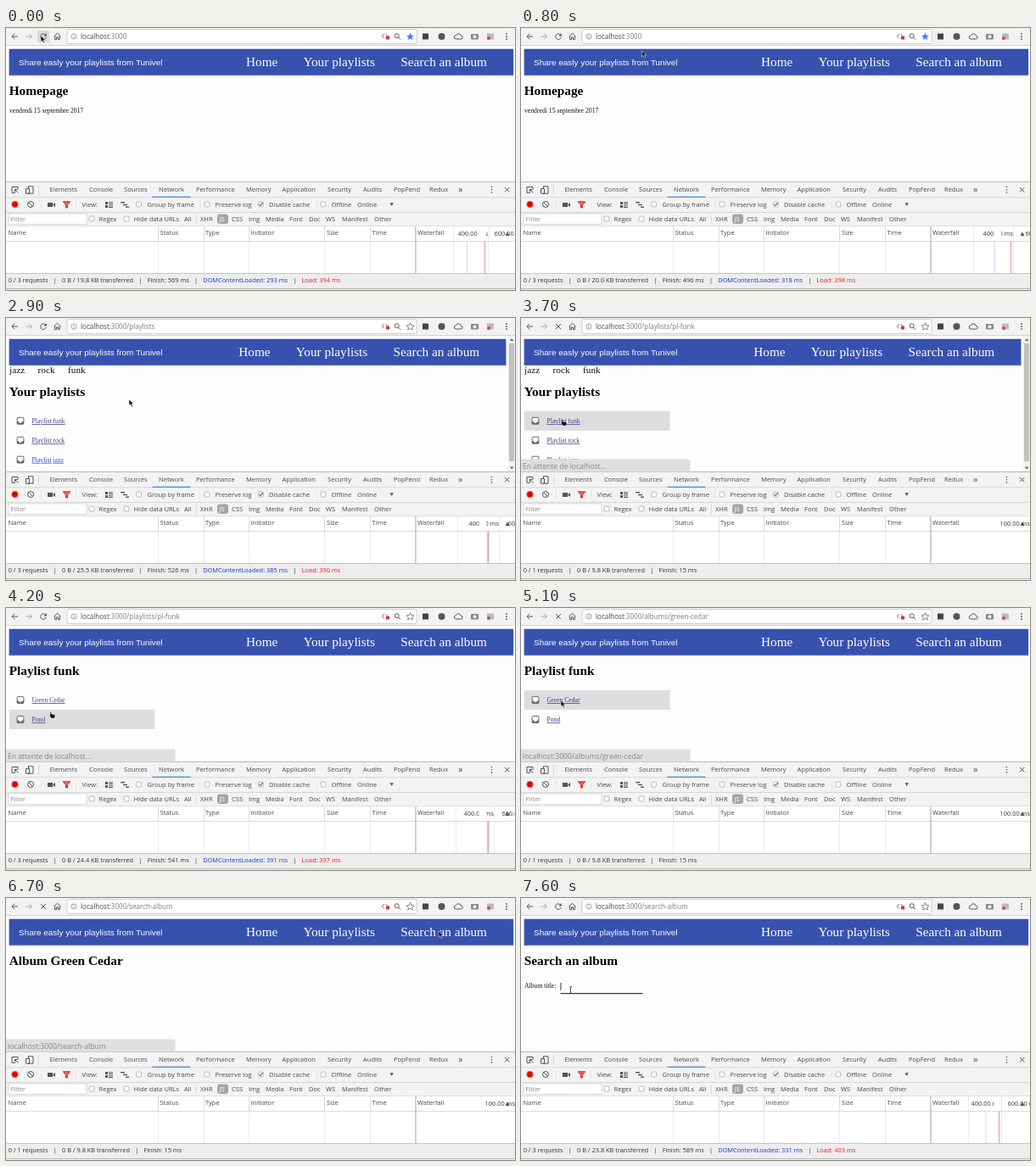
Animation, 600 px wide and 309 px high, one loop 8 s. Source, as an HTML page:

```html
<!DOCTYPE html>
<html lang="en">
<head>
<meta charset="utf-8">
<title>Playlist app walkthrough</title>
<style>
html, body { margin: 0; width: 100%; height: 100%; overflow: hidden; background: #fff; }
svg { display: block; width: 100vw; height: 100vh; }
text { white-space: pre; }
.ui { font: 7.55px "Open Sans", "Noto Sans", sans-serif; fill: #484848; }
.url { font-size: 8.05px; }
.hint { font-size: 8.6px; fill: #858585; }
.foot { font-size: 7.4px; fill: #333; }
.sans { font: 9.95px "Liberation Sans", Arial, sans-serif; fill: #fff; }
.serif { font: 7.7px "Liberation Serif", Times, serif; fill: #111; }
.nav { font-size: 15.25px; fill: #fff; }
.tag { font-size: 11.3px; }
.h1 { font-size: 15.3px; font-weight: bold; fill: #000; }
.link { text-decoration: underline; text-decoration-thickness: .5px; }
.line { fill: none; stroke: #555; stroke-width: 1; }
</style>
</head>
<body>
<svg viewBox="0 0 600 309" preserveAspectRatio="none">
  <g id="page"></g>
  <g id="frame"></g>
  <g id="live"></g>
  <g id="pointer"></g>
</svg>
<script>
const $ = id => document.getElementById(id);
const text = (x, y, str, cls = 'ui', attrs = '') => `<text x="${x}" y="${y}" class="${cls}" ${attrs}>${str}</text>`;
const rect = (x, y, w, h, fill, attrs = '') => `<rect x="${x}" y="${y}" width="${w}" height="${h}" fill="${fill}" ${attrs}/>`;
const dot = (x, y, r, fill, attrs = '') => `<circle cx="${x}" cy="${y}" r="${r}" fill="${fill}" ${attrs}/>`;
const path = (d, attrs = 'class="line"') => `<path d="${d}" ${attrs}/>`;
const row = (y, items, cls) => items.map(([x, str]) => text(x, y, str, cls)).join('');
const fill = color => `fill="${color}"`;

// ---- Fixed browser and developer tools parts ----
function check(x, y, on) {
  return rect(x - 2.9, y - 2.9, 5.8, 5.8, '#fff', 'rx="1" stroke="#aaa" stroke-width=".8"') +
    (on ? path(`M${x - 2} ${y}l1.5 1.7 2.7-3.7`, 'fill="none" stroke="#333"') : '');
}

function toolbar() {
  const dots = [7, 10, 13].map(y => dot(590, y, .9, '#555')).join('');
  return rect(0, 0, 600, 20, '#f2f2f2') + rect(0, 20, 600, .8, '#ccc') +
    rect(72, 1.5, 412, 17, '#fff', 'rx="2" stroke="#c4c4c4" stroke-width=".8"') +
    path('M14 10H7M10.2 6.7L6.9 10l3.3 3.3') +
    path('M23.5 10h7M27.3 6.7l3.3 3.3-3.3 3.3', 'fill="none" stroke="#aaa"') +
    path('M56.5 10l4-3.8 4 3.8M57.7 9.5v4.2h1.8v-2.8h2v2.8h1.8V9.5') +
    dot(80, 10, 3.1, 'none', 'stroke="#777" stroke-width=".7"') + path('M80 9.5v2.3M80 7.8v.8', 'stroke="#777" stroke-width=".8"') +
    path('M445.7 7.2l-2.3 2.6 2.3 2.6M447.8 7.2l2 2.3', 'fill="none" stroke="#555" stroke-width=".9"') + rect(448, 9.5, 4, 4, '#d33') +
    dot(460.7, 9.2, 2.5, 'none', 'class="line"') + path('M462.5 11l2.7 2.7') +
    rect(491, 6.5, 7, 7, '#444') + dot(513.5, 10, 4, '#555') +
    path('M530.3 13h6a1.9 1.9 0 0 0 0-3.8a3 3 0 0 0-5.8-.4a2.1 2.1 0 0 0-.2 4.2z') +
    rect(548, 7, 9, 6.5, '#888', 'rx="1"') + dot(552.5, 10.3, 2, '#eee') +
    rect(567, 6.5, 8, 7, '#bbb') + dot(569, 12, 2, '#d44') + dots;
}

function devtools() {
  const bars = rect(0, 181, 600, 128, '#f3f3f3') + rect(0, 181, 600, .8, '#aaa') +
    [199.5, 217, 233.5].map(y => rect(0, y, 600, .7, '#ccc')).join('') +
    rect(0, 234, 600, 55, '#fff') + rect(0, 251, 600, .7, '#ccc') +
    rect(0, 289, 600, 18, '#ededed') + rect(0, 289, 600, .8, '#bbb') + rect(0, 307, 600, .8, '#aaa') +
    [179, 233, 286, 375, 429].map(x => rect(x, 234, .7, 17, '#ccc') + rect(x, 251, .7, 38, '#e2e2e2')).join('') +
    rect(482.5, 234, .9, 55, '#999');
  const tabs = row(193, [[51.5, 'Elements'], [98, 'Console'], [139, 'Sources'], [180, 'Network'],
    [224, 'Performance'], [283, 'Memory'], [325.5, 'Application'], [379, 'Security'],
    [421, 'Audits'], [457, 'PopFend'], [499, 'Redux']]) +
    text(533, 194, '»', 'ui', 'style="font-size:11px"') + rect(172.5, 198.7, 45, 1.3, '#4a8ad8') +
    path('M11 194.3H7v-6.8h7v3M10.5 190.5l4 4M10.5 190.5v3M10.5 190.5h3') +
    path('M26 186.8h6v8.4h-6M26.5 186.8v2.5M23.5 189.5h4v5.7h-4z') + rect(38, 185, .7, 12, '#ccc') +
    [187.5, 190.7, 193.9].map(y => dot(572.5, y, .8, '#555')).join('') + path('M588 188l5.4 5.4M593.4 188l-5.4 5.4');
  const tools = row(211, [[89.5, 'View:'], [166.5, 'Group by frame'], [246.5, 'Preserve log'], [310, 'Disable cache'],
    [383.5, 'Offline'], [414, 'Online']]) +
    dot(10.5, 208, 3.9, '#e00000', 'stroke="#f3a0a0" stroke-width=".8"') +
    dot(29, 208, 3.5, 'none', 'class="line"') + path('M26.6 205.6l4.8 4.8') +
    rect(49, 206, 6, 5, '#555') + path('M55 208.5l3-2.5v5z', fill('#555')) +
    path('M67.3 204.8h8.4l-3.2 3.8v3.4h-2v-3.4z', 'fill="#e66" stroke="#e02020"') +
    [205, 209].map(y => rect(117, y, 3, 3, '#555') + rect(121, y + .2, 5, 1, '#555') + rect(121, y + 2, 5, 1, '#555')).join('') +
    rect(135, 205, 5, 1.4, '#555') + rect(138, 207.8, 5, 1.4, '#555') + rect(141, 210.5, 4, 1.4, '#555') +
    [156.5, 237, 300.5, 374].map((x, i) => check(x, 208, i === 2)).join('') +
    [41, 82, 228, 366].map(x => rect(x, 203, .6, 11, '#ddd')).join('') +
    path('M452.5 206.3h4.4l-2.2 3.6zM458.5 205v6', fill('#555'));
  const filters = rect(3, 219, 92, 12.5, '#fff', 'stroke="#ccc" stroke-width=".7"') +
    rect(249, 219.5, 13, 11.5, '#a5a5a5', 'rx="3"') +
    row(228, [[109.5, 'Regex'], [150.5, 'Hide data URLs'], [210, 'All'], [229, 'XHR'], [266, 'CSS'],
      [286, 'Img'], [306, 'Media'], [334, 'Font'], [357, 'Doc'], [377, 'WS'], [396, 'Manifest'], [434, 'Other']]) +
    text(5.5, 228, 'Filter', 'ui', 'style="fill:#888"') +
    text(251.5, 228, 'JS', 'ui', 'style="fill:#fff"') + rect(224, 220, .6, 11, '#ccc') +
    check(101, 225) + check(142, 225);
  const heads = row(244.3, [[2.5, 'Name'], [181.5, 'Status'], [235, 'Type'], [288.5, 'Initiator'],
    [378, 'Size'], [431.5, 'Time'], [485, 'Waterfall']]);
  return bars + tabs + tools + filters + heads;
}

// ---- Web pages ----
const tray = y => `<g transform="translate(17 ${y})">` +
  rect(-3.9, -3.9, 7.8, 7.8, '#fff', 'rx="1" stroke="#666"') +
  path('M-4 1h2.2a1.8 1.8 0 0 0 3.6 0H4v3h-8z', fill('#666')) + '</g>';
const list = (y, names, hover, blue) => names.map((name, i) => {
  const mid = y + i * 22.9;
  return (i === hover ? rect(4, mid - 11.5, 171.5, 23, '#dddddf') : '') + tray(mid) +
    text(30.5, mid + 2.7, name, 'serif link', `style="fill:${i === blue ? '#2b4bd8' : '#4d3a86'}"`);
}).join('');
const title = (str, y = 78.8) => text(3.7, y, str, 'serif h1');

const pages = {
  home: () => title('Homepage') + text(4, 100, 'vendredi 15 septembre 2017', 'serif'),
  lists: s => row(65, [[4, 'jazz'], [37.5, 'rock'], [73, 'funk']], 'serif tag') + title('Your playlists', 91.6) +
    list(121.3, ['Playlist funk', 'Playlist rock', 'Playlist jazz'], s.hover, 2) +
    rect(592, 21, 8, 160, '#f1f1f1') + rect(593, 30, 6, 139, '#c1c1c1') +
    path('M594 27l2.2-3 2.2 3zM594 175.5l2.2 3 2.2-3z', fill('#666')),
  funk: s => title('Playlist funk') + list(108.5, ['Green Cedar', 'Pond'], s.hover),
  album: () => title('Album Green Cedar'),
  search: s => title('Search an album') + text(4, 106, 'Album title:', 'serif') +
    rect(46.5, 112, 97, 1.2, '#333') + (s.caret ? rect(46.5, 100, .9, 9, '#222') : '')
};

function page(s) {
  const shift = s.page === 'lists' ? 8.7 : 0;
  const bar = rect(3.5, 25.5, 594.8 - shift, 31.5, '#000', 'opacity=".13"') + rect(3.7, 24.7, 594.4 - shift, 31, '#3751ae') +
    text(15, 44, 'Share easly your playlists from Tunivel', 'sans') +
    row(45, [[283 - shift, 'Home'], [350.5 - shift, 'Your playlists'], [465.3 - shift, 'Search an album']], 'serif nav');
  return rect(0, 20, 600, 162, '#fdfdfe') + bar + pages[s.page](s);
}

// ---- Changing browser parts ----
function footer([count, size, finish, dom, load]) {
  const parts = [[`0 / ${count} requests`], [`0 B / ${size} KB transferred`], [`Finish: ${finish} ms`]];
  if (dom) parts.push([`DOMContentLoaded: ${dom} ms`, '#1437d2'], [`Load: ${load} ms`, '#e8192c']);
  return text(2.7, 300, parts.map(([str, color = '#333'], i) =>
    (i ? '<tspan dx="6.2">|</tspan>' : '') + `<tspan dx="${i ? 6.2 : 0}" style="fill:${color}">${str}</tspan>`).join(''), 'ui foot');
}

function waterfall(s) {
  const label = (x, n) => text(x, 245, n + '.00 ms', 'ui foot', 'text-anchor="end"');
  const grid = x => rect(x, 234, .7, 55, '#e2e2e2');
  const sort = path('M588.5 245l2.5-4.5 2.5 4.5z', fill('#555'));
  if (!s.ticks) return label(600, 100) + sort;
  const [edge, near, far, blue, red] = s.ticks;
  return grid(edge) + (near ? grid(near) + label(near, 400) + rect(557.5, 235, 8.5, 15, '#fff') : '') +
    label(far, 600) + sort + rect(blue, 251.5, 1, 37.5, '#cbd7f5') + rect(red, 251.5, 1.1, 37.5, '#dd9a9a');
}

function live(s) {
  const star = path('M476.5 5.6l1.3 3 3.2.3-2.4 2.1.7 3.1-2.8-1.7-2.8 1.7.7-3.1-2.4-2.1 3.2-.3z',
    s.page === 'home' ? fill('#4285f4') : 'fill="none" stroke="#666" stroke-width=".8"');
  const reload = s.busy ? path('M41 7l6 6M47 7l-6 6')
    : path('M46.8 8.4a3.3 3.3 0 1 0 .4 2.5') + path('M47.8 6v3.4h-3.4z', fill('#555'));
  const hint = s.hint && path('M0 166.5h197q2.5 0 2.5 2.5v12.5H0z', fill('#dfdfdf')) + text(2, 177.5, s.hint, 'ui hint');
  return (s.hot ? rect(37, 3, 14, 14, '#d9d9d9', 'rx="2"') : '') + reload + star +
    text(88, 13, `localhost<tspan style="fill:#7c7c7c">:3000${s.url}</tspan>`, 'ui url') +
    (hint || '') + footer(s.net) + waterfall(s);
}

// ---- Timeline: each entry changes some of the state ----
const site = 'localhost:3000';
const waiting = 'En attente de localhost...';
const clear = { net: [1, '9.8', 15], ticks: null };
const scenes = [
  [0, { page: 'home', url: '', busy: false, hot: true, hint: '', hover: -1, caret: false,
    net: [3, '19.8', 569, 293, 394], ticks: [527, 568, 611, 543, 564] }],
  [100, { busy: true }],
  [200, clear],
  [500, { busy: false, hot: false, net: [3, '20.0', 496, 318, 398], ticks: [533, 580, 630, 558, 577] }],
  [1700, { hint: site + '/playlists' }],
  [2400, { busy: true, url: '/playlists', ...clear }],
  [2700, { busy: false, page: 'lists', hint: '', net: [3, '25.5', 526, 385, 390], ticks: [532, 581, 627, 567, 568] }],
  [3300, { hover: 0, hint: site + '/playlists/pl-funk' }],
  [3700, { busy: true, url: '/playlists/pl-funk', hint: waiting, ...clear }],
  [4100, { busy: false, page: 'funk', hover: 1, net: [3, '24.4', 541, 391, 397], ticks: [530, 575, 620, 567, 568] }],
  [4400, { hint: site + '/albums/pond' }],
  [4700, { hover: 0, hint: site + '/albums/green-cedar' }],
  [5000, { busy: true, url: '/albums/green-cedar', ...clear }],
  [5400, { busy: false, page: 'album', hover: -1, hint: '', net: [3, '19.8', 575, 307, 416], ticks: [527, 0, 608, 545.5, 568] }],
  [6300, { hint: site + '/search-album' }],
  [6600, { busy: true, url: '/search-album', ...clear }],
  [7000, { busy: false, page: 'search', hint: '', net: [3, '23.8', 589, 331, 403], ticks: [527, 566, 609, 547.5, 563] }],
  [7600, { caret: true }]
];

// Pointer stops: time, x, y, shape
const stops = [
  [0, 41, 9, 'arrow'], [500, 41, 9, 'arrow'], [1400, 345, 62, 'arrow'], [1700, 418, 34, 'hand'],
  [1800, 425, 32, 'hand'], [2200, 408, 37, 'hand'], [2500, 408, 37, 'arrow'], [2900, 145, 96, 'arrow'],
  [3300, 48, 119, 'hand'], [4000, 48, 119, 'hand'], [4200, 52, 122, 'hand'], [4700, 47, 109, 'hand'],
  [5000, 47, 109, 'arrow'], [5400, 47, 109, 'arrow'], [5800, 309, 83, 'arrow'], [6300, 510, 39, 'hand'],
  [6600, 510, 39, 'arrow'], [7000, 510, 39, 'arrow'], [7400, 58.5, 108.5, 'beam'], [8000, 58.5, 108.5, 'beam']
];
const shapes = {
  arrow: path('M0 0v7.2l1.7-1.5 1.3 2.9 1.4-.7-1.3-2.7h2.4z', 'fill="#111" stroke="#fff" stroke-width=".5"'),
  hand: path('M0 .8Q.7 0 1.4.8V3l3.6.7q.9.3.8 1.3L5.2 8H1.4L-.9 5Q-.6 4 0 4.6z', 'fill="#111" stroke="#fff" stroke-width=".4"'),
  beam: path('M-1.7-4Q0-4 0-3Q0-4 1.7-4M0-3v6M-1.7 4Q0 4 0 3Q0 4 1.7 4', 'fill="none" stroke="#333" stroke-width=".9"')
};

function pointer(t) {
  const i = stops.findIndex(stop => stop[0] > t);
  const [t0, x0, y0, kind] = stops[i - 1], [t1, x1, y1] = stops[i];
  const k = (t - t0) / (t1 - t0);
  return `<g transform="translate(${x0 + (x1 - x0) * k} ${y0 + (y1 - y0) * k})">${shapes[kind]}</g>`;
}

$('frame').innerHTML = toolbar() + devtools();
const start = performance.now();
let shown = -1;
function draw(now) {
  const t = Math.floor((Math.max(0, now - start) % 8000) / 100) * 100;
  if (t !== shown) {
    shown = t;
    const state = Object.assign({}, ...scenes.filter(([at]) => at <= t).map(scene => scene[1]));
    $('page').innerHTML = page(state);
    $('live').innerHTML = live(state);
    $('pointer').innerHTML = pointer(t);
  }
  requestAnimationFrame(draw);
}
draw(start);
</script>
</body>
</html>
```
